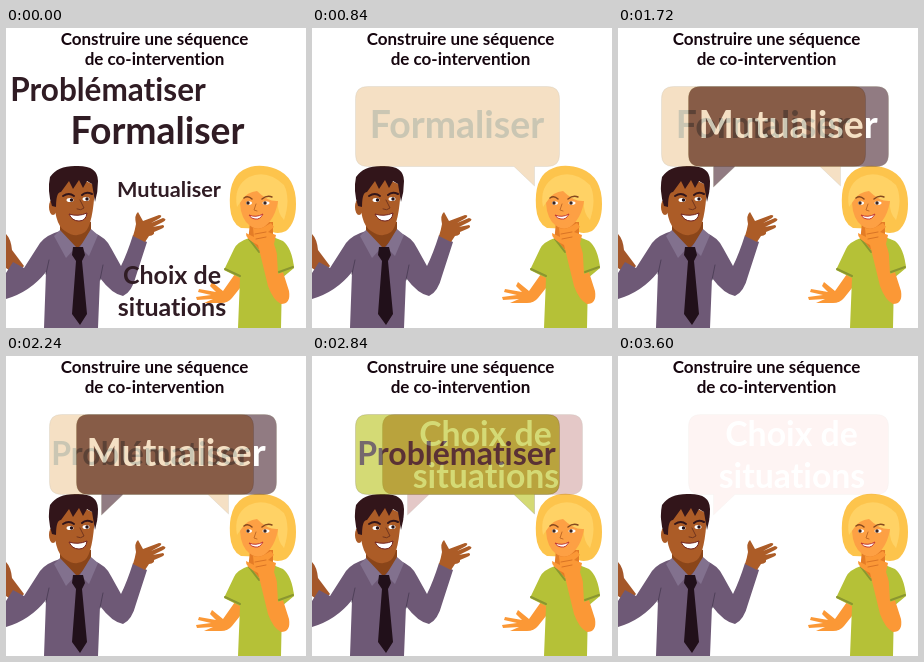
Recreate the animation shown at these times as an HTML page. Size 300x300 px, loop 3640 ms.

```html
<!DOCTYPE html>
<html lang="fr">
<head>
<meta charset="utf-8">
<title>Construire une séquence</title>
<style>
html, body { margin: 0; width: 100%; height: 100%; overflow: hidden; background: #fff; }
svg { display: block; width: 100%; height: 100%; }
text {
  font-family: Lato, "Open Sans", sans-serif; font-weight: 700;
  font-variant-ligatures: none; text-anchor: middle; fill: #301c24;
}
.title text { fill: #16060f; }
.line { fill: none; stroke-linecap: round; stroke-linejoin: round; }

/* Bubbles cross-fade additively and start with a warm tint */
#bubbles { isolation: isolate; }
#bubbles > g { mix-blend-mode: plus-lighter; }
.green { --fill: #bfc82f; --ink: #301c24; --glow: #8c8a10; }
.plum { --fill: #5a3843; --ink: #fff; --glow: #fff; }
#bubbles use { fill: color-mix(in srgb, var(--fill) var(--full), #ff7868); stroke: #5a50304d; }
#bubbles text { fill: color-mix(in srgb, var(--ink) var(--full), var(--glow)); }
</style>
</head>
<body>
<svg viewBox="0 0 300 300">
  <defs>
    <path id="right" d="M55.500 58.500H235.500Q247.500 58.500 247.500 70.500V126.500Q247.500 138.500 235.500 138.500H222.500V158L202 138.500H55.500Q43.500 138.500 43.500 126.500V70.500Q43.500 58.500 55.500 58.500Z"/>
    <path id="left" d="M82.500 58.500H258.500Q270.500 58.500 270.500 70.500V126.500Q270.500 138.500 258.500 138.500H117L95.500 159V138.500H82.500Q70.500 138.500 70.500 126.500V70.500Q70.500 58.500 82.500 58.500Z"/>
  </defs>

  <g class="title" font-size="17">
    <text x="148.500" y="17">Construire une séquence</text>
    <text x="148.500" y="37">de co-intervention</text>
  </g>

  <g id="people">
    <g id="man">
      <path fill="#a4572a" d="M0 206Q5 211 6 222L18 238L10 247L0 240Z"/>
      <path fill="#6e5976" d="M54 203Q40 207 34 215L18 240L7 234L0 245V271Q24 264 40 244L38 300H92L94 250Q106 266 117 268Q126 264 130 248L141 214L127 207Q121 226 115 238L105 220Q100 209 86 204Z"/>
      <path class="line" stroke="#4f4059" d="M40 246L43 232M94 252L97 237"/>
      <path fill="#8a4519" d="M54 190V206L71 221L85 206V194Z"/>
      <path fill="#ac5c27" d="M48 160Q47 196 59 203Q70 211 79 204Q87 197 89 158Q70 144 48 160Z"/>
      <ellipse cx="47" cy="179" rx="4" ry="8" fill="#ac5c27"/>
      <path fill="#32151a" d="M46 178Q41 163 44 149Q52 137 72 138Q92 138 92 153Q92 164 89 174L86 156L81 153L77 160L73 152L67 161L63 153L55 164Q50 164 50 179Z"/>
      <path class="line" stroke="#32151a" stroke-width="2" d="M57 168Q63 164 68 168M76 167Q80 163 86 166"/>
      <g fill="#fff"><ellipse cx="64" cy="172" rx="3.500" ry="2"/><ellipse cx="80" cy="171" rx="3.500" ry="2"/></g>
      <g fill="#241016"><circle cx="65.500" cy="172" r="1.700"/><circle cx="81" cy="171" r="1.700"/></g>
      <path class="line" stroke="#71351e" d="M74 172L78 180Q75 183 71 181"/>
      <path fill="#fff" stroke="#71221e" d="M63 186Q72 189 81 185Q80 193 73 193Q66 193 63 186Z"/>
      <path fill="#82718e" d="M54 202L70 219L60 230L48 208ZM85 201L74 219L83 228L92 207Z"/>
      <path fill="#21101a" d="M67 219H77L79 227L76 233L81 286L74 297L66 286L70 233L66 227Z"/>
      <path fill="#ac5c27" d="M127 208Q129 202 130 196Q128 187 132 184L137 193L153 187Q157 187 154 190L145 195L157 190Q162 191 157 194L147 199L157 197Q160 199 155 201L148 204Q149 207 143 208L139 214Z"/>
    </g>
    <g id="woman">
      <path fill="#fdc44c" d="M224 179Q222 151 237 142Q251 134 270 141Q290 149 290 176Q290 195 280 203Q270 208 261 201L235 200Q225 195 224 179Z"/>
      <path fill="#e47c26" d="M244 194H267V218L253 224L242 215Z"/>
      <path fill="#fb9836" d="M236 236L217 263L206 254L204 258L210 264L193 261L192 264L205 267L190 269L191 272L207 271L198 275L215 275Q222 275 226 270L242 250Z"/>
      <path fill="#b5c137" d="M243 210Q231 214 228 221L218 242L234 250L232 300H275L276 250L288 240Q286 220 277 213L267 209L254 223Z"/>
      <path class="line" stroke="#8a9630" stroke-width="2" d="M219 241L234 248M243 211L253 224L266 210"/>
      <path fill="#fda044" d="M234 167Q233 185 240 194Q249 204 258 199Q272 189 273 163Q256 151 234 167Z"/>
      <path fill="#ffd265" d="M231 179Q227 158 243 149Q261 141 278 157Q285 171 278 192Q271 185 272 173Q262 174 251 163Q241 164 236 172Z"/>
      <path class="line" stroke="#85491f" stroke-width="1.500" d="M238 170Q242 167 246 171M256 171Q261 167 266 169"/>
      <g fill="#fff"><ellipse cx="243" cy="175" rx="3" ry="1.800"/><ellipse cx="260" cy="175" rx="3.500" ry="1.800"/></g>
      <g fill="#3a2420"><circle cx="242" cy="175" r="1.700"/><circle cx="259" cy="175" r="1.700"/></g>
      <path class="line" stroke="#c36c28" d="M250 176L248 182L251 183"/>
      <path fill="#fff" stroke="#c33830" d="M243 187Q250 190 257 186Q254 192 249 191Q245 191 243 187Z"/>
      <path fill="#fb9836" d="M247 200Q253 202 258 199L265 195L268 199L262 204L270 207L268 216L283 263Q285 276 275 276Q267 272 262 258L252 217Q239 211 240 205L248 209Z"/>
      <path class="line" stroke="#d97425" d="M249 206L260 204M250 211L260 209"/>
      <path fill="#b5c137" d="M270 211Q283 213 288 240L272 246Z"/>
      <path class="line" stroke="#8a9630" stroke-width="2" d="M287 239L273 244"/>
    </g>
  </g>

  <g id="words">
    <text x="102" y="73" font-size="31.500">Problématiser</text>
    <text x="151.500" y="116" font-size="37.300">Formaliser</text>
    <text x="163" y="169" font-size="21.700">Mutualiser</text>
    <text x="166" y="256" font-size="25">Choix de</text>
    <text x="166" y="288" font-size="25">situations</text>
  </g>

  <g id="bubbles">
    <g id="formal" class="green">
      <use href="#right"/>
      <text x="145" y="110" font-size="37.400">Formaliser</text>
    </g>
    <g id="share" class="plum">
      <use href="#left"/>
      <text x="170" y="110" font-size="37.400">Mutualiser</text>
    </g>
    <g id="problem" class="green">
      <use href="#right"/>
      <text x="144.500" y="109" font-size="32">Problématiser</text>
    </g>
    <g id="choose" class="plum">
      <use href="#left"/>
      <text x="173.500" y="90" font-size="33.800">Choix de</text>
      <text x="174" y="132" font-size="33.800">situations</text>
    </g>
  </g>
</svg>
<script>
const LOOP = 3640, STEP = 40, FADE = 240;

// When each bubble starts to appear and to vanish
const bubbles = {
  formal: [760, 1560],
  share: [1560, 2160],
  problem: [2160, 2760],
  choose: [2760, 3380]
};

const ramp = (t, from) => Math.min(1, Math.max(0, (t - from) / FADE));

function show(id, opacity) {
  const { style } = document.getElementById(id);
  style.opacity = opacity;
  style.setProperty("--full", Math.min(100, opacity * 150) + "%");
}

function draw(now) {
  const t = Math.floor(now % LOOP / STEP) * STEP;
  const opening = 1 - ramp(t, 0);
  show("words", opening);
  show("people", Math.max(opening, ramp(t, 270)));
  for (const [id, [enter, leave]] of Object.entries(bubbles)) {
    show(id, ramp(t, enter) - ramp(t, leave));
  }
}

const start = performance.now();
function tick() {
  draw(performance.now() - start);
  requestAnimationFrame(tick);
}
tick();
</script>
</body>
</html>
```
